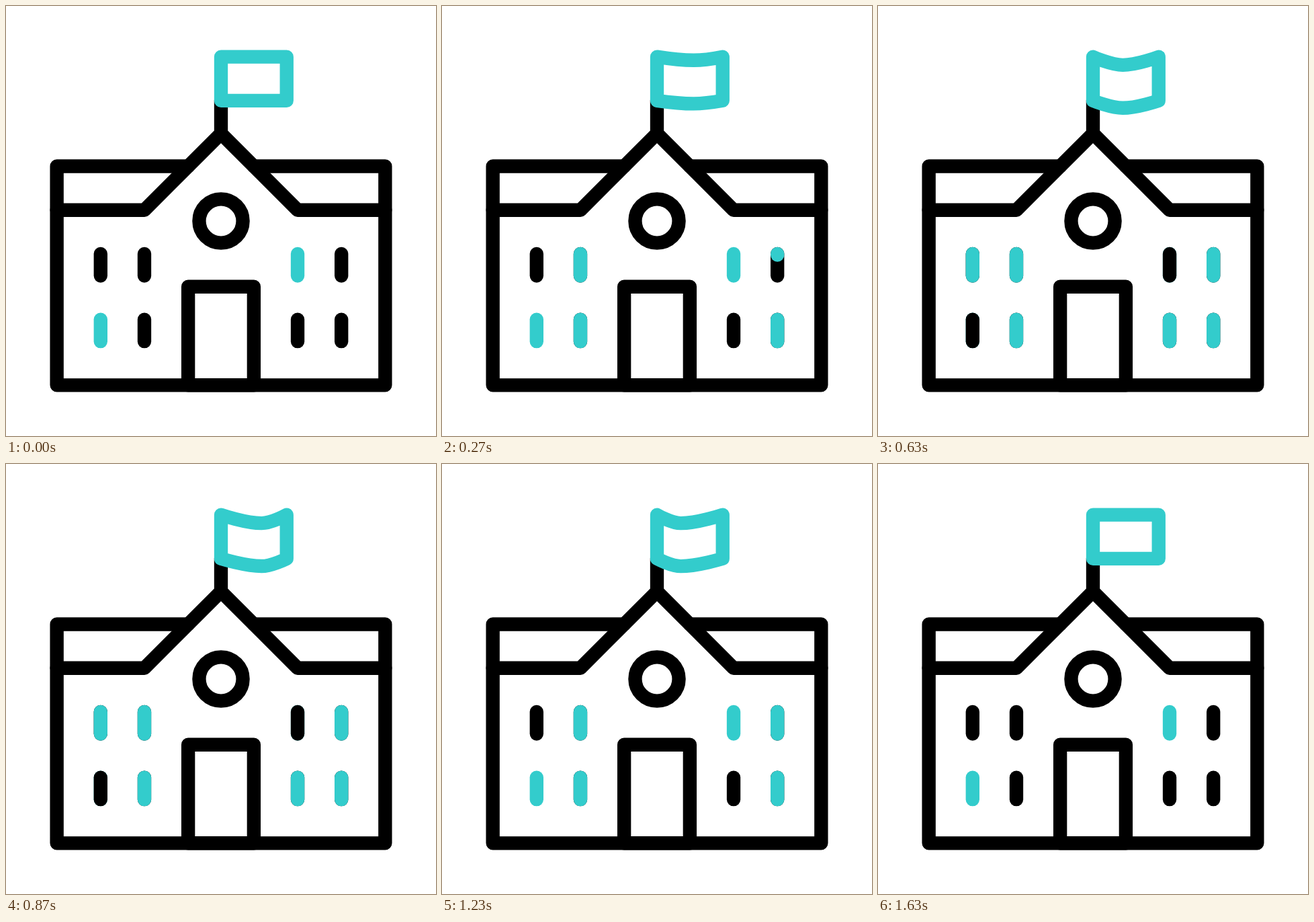
An HTML page for the animation above (1.67 s loop, 640 by 640 pixels).

```html
<!DOCTYPE html>
<html lang="en">
<head>
<meta charset="utf-8">
<title>School building</title>
<style>
  html, body { margin: 0; width: 100%; height: 100%; overflow: hidden; background: #fff; }
  svg { display: block; width: 100%; height: 100%; }
  g { fill: none; stroke: #000; stroke-width: 1.25; stroke-linecap: round; stroke-linejoin: round; }
  #flag { stroke: #33cccc; }
</style>
</head>
<body>
<svg viewBox="0 0 640 640">
  <g transform="translate(320 320) scale(16.29)">
    <path d="M-15-1V15H15V-1M-15-1V-5H-3M3-5H15V-1"/>
    <path d="M-15-1H-7L0-8L7-1H15M0-8V-11"/>
    <circle r="2"/>
    <path d="M-3 15V6H3V15Z"/>
    <g id="windows"></g>
    <path id="flag"/>
  </g>
</svg>
<script>
const LOOP = 1670, STEP = 100 / 3, LAST = 49;
const BLACK = '#000', TEAL = '#33cccc';
const UPPER = 3, LOWER = 9, PANE = 2;

// Column, row and whether the pane starts lit, in the order they switch.
const PANES = [
  [-7, LOWER], [-7, UPPER], [11, LOWER], [11, UPPER],
  [-11, LOWER, true], [-11, UPPER], [7, LOWER], [7, UPPER, true]
];

// [frame, number of panes switched]
const SWITCHED = [[0, 0], [3.2, 0], [8, 3.05], [16, 8], [31, 8], [32, 7.27],
  [37, 4], [43, 0.34], [43.6, 0]];

// [frame, x of the lowest point, sag]
const WAVE = [[0, 3, 0], [10, 3.4, 0.35], [20, 2.7, 0.76], [30, 4.25, 0.77],
  [40, 1.6, 0.77], [49, 3, 0]];

const linear = t => t;
const smooth = t => t * t * (3 - 2 * t);

function sample(keys, frame, ease) {
  const i = keys.findIndex(key => key[0] >= frame);
  if (i < 0) return keys[keys.length - 1].slice(1);
  if (i === 0) return keys[0].slice(1);
  const a = keys[i - 1], b = keys[i];
  const k = ease((frame - a[0]) / (b[0] - a[0]));
  return a.slice(1).map((v, n) => v + (b[n + 1] - v) * k);
}

const windows = document.getElementById('windows');
const flag = document.getElementById('flag');

function addLine(x, y, color) {
  const line = document.createElementNS('http://www.w3.org/2000/svg', 'path');
  line.setAttribute('d', `M${x} ${y}v${PANE}`);
  line.setAttribute('stroke', color);
  windows.append(line);
  return line;
}

const covers = PANES.map(([x, y, lit]) => {
  addLine(x, y, lit ? TEAL : BLACK);
  return { x, y, line: addLine(x, y, lit ? BLACK : TEAL) };
});

function flagPath(mid, sag) {
  const right = 6, top = -15, bottom = -11, pull = 0.4;
  const before = mid * (1 - pull), after = mid + (right - mid) * pull;
  const high = top + sag, low = bottom + sag * 0.9;
  return `M0 ${top}C0 ${top} ${before} ${high} ${mid} ${high}` +
    `C${after} ${high} ${right} ${top} ${right} ${top}V${bottom}` +
    `C${right} ${bottom} ${after} ${low} ${mid} ${low}` +
    `C${before} ${low} 0 ${bottom} 0 ${bottom}Z`;
}

function draw(time) {
  const frame = Math.min(LAST, Math.floor((time % LOOP + 3.4) / STEP));
  const [switched] = sample(SWITCHED, frame, linear);
  covers.forEach(({ x, y, line }, i) => {
    const part = Math.max(0, Math.min(1, switched - i));
    line.style.display = part > 0.005 ? '' : 'none';
    line.setAttribute('d', `M${x} ${y}v${PANE * part}`);
  });
  flag.setAttribute('d', flagPath(...sample(WAVE, frame, smooth)));
}

const start = performance.now();
function tick() {
  draw(performance.now() - start);
  requestAnimationFrame(tick);
}
tick();
</script>
</body>
</html>
```
